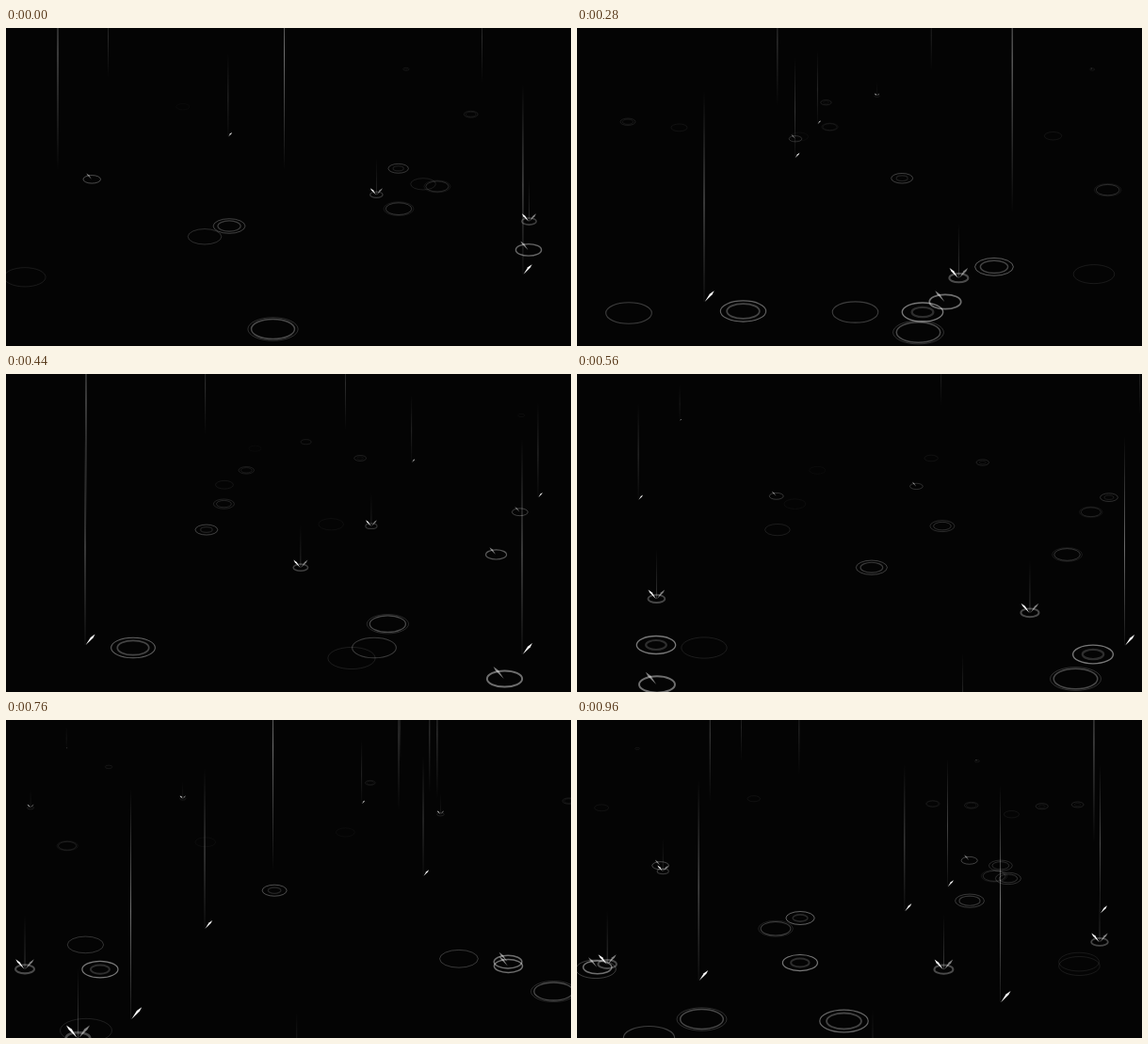
Recreate the animation shown at these times as an HTML page with a canvas. Size 600 px wide and 338 px high, loop 1 s.

```html
<!DOCTYPE html>
<html lang="en">
<head>
<meta charset="utf-8">
<title>Rain</title>
<style>
html, body { margin: 0; width: 100%; height: 100%; overflow: hidden; background: #040404; }
canvas { display: block; }
</style>
</head>
<body>
<canvas id="stage" width="600" height="338"></canvas>
<script>
const ctx = document.getElementById('stage').getContext('2d');
const W = 600, H = 338;
const STEP = 40, STEPS = 25;
const FIRST_AGE = -2, LAST_AGE = 6;

// The nearest drops: x, y and the step in which each lands.
const near = [
  [55, 303, 2], [295.5, 302, 2], [362.5, 323.5, 3], [176.5, 301, 4],
  [367, 302, 5], [391, 291, 6], [135, 291, 8], [529.5, 324, 10],
  [84, 288, 12], [548, 298, 12], [85, 330, 13], [581.5, 288.5, 15],
  [76.5, 338, 19], [132.5, 318, 20], [283.5, 320, -4], [449.5, 300, 25]
];

let seed = 7;
function random(min, max) {
  seed = (seed * 16807) % 2147483647;
  return min + (max - min) * seed / 2147483647;
}

const drops = [];
function addDrop(x, y, land) {
  drops.push({ x, y, land });
  // Drops under way when the loop starts also close it.
  if (land < 2) drops.push({ x, y, land: land + STEPS });
}

for (const drop of near) addDrop(...drop);
for (let land = -LAST_AGE; land <= STEPS + 1; land++) {
  for (let i = 0; i < 2; i++) addDrop(random(20, W), random(30, 285), land);
}
// These land in front of the stage, so only their streaks show.
for (let land = 4; land < STEPS; land += 5) addDrop(random(280, 540), random(380, 400), land);

const white = a => `rgba(255,255,255,${a})`;

function streak({ x, y, depth }, age) {
  const end = (1.6 + 0.55 * age) * y;
  const start = end - 0.82 * y;
  const w = 0.45 + 0.0016 * y;
  const fade = ctx.createLinearGradient(0, start, 0, end);
  fade.addColorStop(0, white(0));
  fade.addColorStop(0.5, white(0.45 * depth));
  fade.addColorStop(1, white(0));
  ctx.fillStyle = fade;
  ctx.fillRect(x - w / 2, start, w, Math.min(end, y) - start);
}

function sliver({ x, y, size }, side, alpha) {
  const shape = [[0.03, 0], [0.25, -0.35], [0.46, -0.5], [0.37, -0.33]];
  ctx.fillStyle = white(alpha);
  ctx.beginPath();
  for (const [dx, dy] of shape) ctx.lineTo(x + side * dx * size, y + dy * size);
  ctx.fill();
}

function ring({ x, y, size, depth }, age, strength) {
  if (age < 0 || age > 4) return;
  const r = size * (1.04 - 0.57 * ((4 - age) / 4) ** 2);
  const alpha = 0.46 - 0.055 * (age - 1.8) ** 2;
  ctx.strokeStyle = white(alpha * strength * depth);
  ctx.lineWidth = Math.max(0.5, size * 0.095 * 0.78 ** age);
  ctx.beginPath();
  ctx.ellipse(x, y, r, r * 0.46, 0, 0, Math.PI * 2);
  ctx.stroke();
}

function drawDrop({ x, y }, age) {
  const drop = { x, y, size: 0.08 * y, depth: Math.min(1, 0.15 + y / 300) };
  if (age <= 0) streak(drop, age);
  ring(drop, age, 1);
  ring(drop, age - 2, 0.6);
  if (age === -1) sliver(drop, 1, 1);
  if (age === 0) {
    sliver(drop, 1, 0.5);
    sliver(drop, -1, 1);
  }
  if (age === 1) sliver(drop, -1, 0.5);
}

function render(time) {
  const step = Math.floor(time / STEP) % STEPS;
  ctx.fillStyle = '#040404';
  ctx.fillRect(0, 0, W, H);
  for (const drop of drops) {
    const age = step - drop.land;
    if (age >= FIRST_AGE && age <= LAST_AGE) drawDrop(drop, age);
  }
}

function tick() {
  render(performance.now());
  requestAnimationFrame(tick);
}
tick();
</script>
</body>
</html>
```
